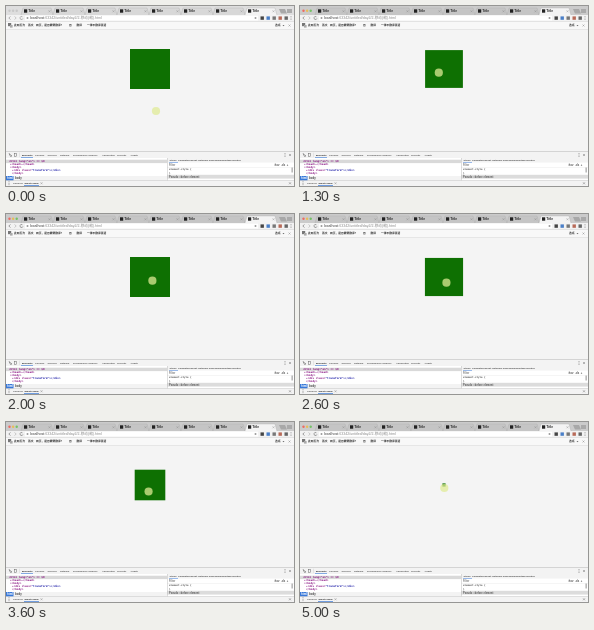
Write an HTML page with a canvas that moves like this. It is 288 by 180 pixels and loops after 6.6 s.

```html
<!DOCTYPE html>
<html lang="en">
<head>
<meta charset="utf-8">
<title>Hover scale demo</title>
<style>
html, body { margin: 0; width: 100%; height: 100%; overflow: hidden; background: #f4f4f4; }
canvas { display: block; width: 288px; height: 180px; }
</style>
</head>
<body>
<canvas id="stage"></canvas>
<script>
const W = 288, H = 180, LOOP = 6600, STEP = 100, SHRINK = 600, MIN_SCALE = 0.08;
const SANS = '"Liberation Sans", "Noto Sans CJK SC", "Noto Sans CJK", sans-serif';
const MONO = '"DejaVu Sans Mono", monospace';
const canvas = document.getElementById('stage');
const ctx = canvas.getContext('2d');
const dpr = window.devicePixelRatio || 1;
canvas.width = W * dpr;
canvas.height = H * dpr;
ctx.scale(dpr, dpr);

// Pointer moves: start, end, from, to
const moves = [
  [150, 700, [150, 105], [137, 66.7]],
  [1230, 1480, [137, 66.7], [146.4, 66.7]],
  [2550, 2980, [146.4, 66.7], [147.3, 120]],
  [3150, 3780, [147.3, 120], [141.4, 57]],
  [4200, 4600, [141.4, 57], [144.3, 66]]
];
// Intervals in which the box is hovered
const hovers = [[1255, 1540], [2560, 2670], [3350, 3520], [4200, LOOP]];

function rect(x, y, w, h, color) {
  ctx.fillStyle = color;
  ctx.fillRect(x, y, w, h);
}

function dot(x, y, r, color) {
  ctx.fillStyle = color;
  ctx.beginPath();
  ctx.arc(x, y, r, 0, Math.PI * 2);
  ctx.fill();
}

function path(points) {
  ctx.beginPath();
  points.forEach(([x, y], i) => i ? ctx.lineTo(x, y) : ctx.moveTo(x, y));
}

function line(points, color, width = 0.6) {
  path(points);
  ctx.strokeStyle = color;
  ctx.lineWidth = width;
  ctx.stroke();
}

function shape(points, color) {
  path(points);
  ctx.fillStyle = color;
  ctx.fill();
}

function text(str, x, y, color, size, font = SANS, weight = 'bold') {
  ctx.fillStyle = color;
  ctx.font = `${weight} ${size}px ${font}`;
  ctx.textBaseline = 'middle';
  ctx.fillText(str, x, y);
  return x + ctx.measureText(str).width;
}

function cross(x, y, color) {
  line([[x - 1, y - 1], [x + 1, y + 1]], color, 0.4);
  line([[x + 1, y - 1], [x - 1, y + 1]], color, 0.4);
}

function menuDots(x, y, color) {
  for (let i = -1; i <= 1; i++) dot(x, y + i * 1.5, 0.45, color);
}

function bezier(a, b, s) {
  return 3 * a * s * (1 - s) ** 2 + 3 * b * s * s * (1 - s) + s ** 3;
}

// CSS "ease"
function ease(t) {
  if (t <= 0) return 0;
  if (t >= 1) return 1;
  let lo = 0, hi = 1;
  for (let i = 0; i < 24; i++) {
    const mid = (lo + hi) / 2;
    if (bezier(0.25, 0.25, mid) < t) lo = mid; else hi = mid;
  }
  return bezier(0.1, 1, lo);
}

function boxScale(t) {
  const hover = hovers.filter(h => t >= h[0]).pop();
  if (!hover) return 1;
  const [enter, leave] = hover;
  let p = ease((Math.min(t, leave) - enter) / SHRINK);
  if (t > leave) p *= 1 - ease((t - leave) / (SHRINK * p));
  return 1 - (1 - MIN_SCALE) * p;
}

function pointer(t) {
  const move = moves.filter(m => t >= m[0]).pop();
  if (!move) return moves[0][2];
  const [start, end, from, to] = move;
  const k = Math.min(1, (t - start) / (end - start));
  const s = k * k * (3 - 2 * k);
  return from.map((v, i) => v + (to[i] - v) * s);
}

function drawTabs(active) {
  rect(0, 0, W, 9, active ? '#cbcbcb' : '#dedede');
  const lights = active ? ['#ee6a62', '#e8bd58', '#74c266'] : ['#c8c8c8', '#c8c8c8', '#c8c8c8'];
  lights.forEach((c, i) => dot(3.5 + i * 3.6, 4.8, 1.2, c));
  for (let i = 0; i < 8; i++) {
    const x = 15 + i * 32;
    const edge = [[x, 9], [x + 2, 2], [x + 30, 2], [x + 32, 9]];
    shape(edge, i === 7 ? '#f3f3f3' : active ? '#c5c5c5' : '#d8d8d8');
    line(edge, '#adadad', 0.4);
    rect(x + 3, 3.3, 3.2, 3.4, '#222');
    text('Title', x + 7.3, 5.2, '#222', 3.3);
    cross(x + 28.5, 5.3, '#888');
  }
  shape([[273, 3], [279, 3], [281, 7.5], [275, 7.5]], '#a8a8a8');
  rect(281, 3, 5, 4, '#aaa');
}

function drawToolbar(active) {
  rect(0, 9, W, 6.5, '#f2f2f2');
  const ink = active ? '#666' : '#888';
  line([[4.5, 10.5], [2.8, 12], [4.5, 13.5]], ink);
  line([[8.5, 10.5], [10.2, 12], [8.5, 13.5]], '#aaa');
  ctx.strokeStyle = ink;
  ctx.beginPath();
  ctx.arc(15.5, 12, 1.5, 0.3, 5.4);
  ctx.stroke();
  rect(19, 9.7, 233, 4.8, '#fff');
  dot(21.5, 12, 1, '#999');
  const x = text('localhost', 24, 12, '#333', 3.6, SANS, 'normal');
  text(':63342/untitled/day2/2-移动(缩).html', x, 12, '#888', 3.6, SANS, 'normal');
  dot(249.5, 12, 1, '#999');
  ['#444', '#4a7fc8', '#777', '#b86a58', '#666'].forEach((c, i) =>
    rect(254.5 + i * 6, 10.4, 3.4, 3.4, c));
  menuDots(285, 12, '#666');
  rect(0, 15.3, W, 0.5, '#c7c7c7');
}

function drawTranslateBar() {
  rect(0, 15.8, W, 8, '#f8f8f8');
  rect(2, 17, 3.2, 3.2, '#777');
  rect(4, 19, 2.6, 2.6, '#aaa');
  [['此网页为', 8], ['英文', 22], ['网页，是否需要翻译？', 30], ['否', 63],
   ['翻译', 70.5], ['一律不翻译英语', 81], ['选项', 269]].forEach(([s, x]) =>
    text(s, x, 19.5, '#333', 2.75));
  shape([[276.5, 19], [278.5, 19], [277.5, 20.2]], '#666');
  cross(283.5, 19.5, '#777');
  rect(0, 23.5, W, 0.5, '#d4d4d4');
}

function drawElements() {
  const tag = '#881280';
  const code = (s, x, y, color = tag) => text(s, x, y, color, 2.7, MONO);
  rect(0, 152, 161, 18, '#fff');
  rect(0, 153.7, 161, 3.4, '#d9d9d9');
  code('<html lang="en"> == $0', 3, 155.4);
  code('▸<head>…</head>', 4, 158.4);
  code('▾<body>', 4, 161.4);
  const x = code('▸<div class=', 6, 164.4);
  code('"transform"></div>', x, 164.4, '#1a1aa6');
  code('</body>', 6, 167.4);
  rect(0, 170, 161, 4.5, '#f3f3f3');
  rect(0, 170, 7.5, 4.5, '#3879d9');
  text('html', 1, 172.3, '#fff', 2.8);
  text('body', 9, 172.3, '#444', 2.8);
}

function drawStyles() {
  rect(161, 152, 127, 22.5, '#fff');
  rect(161, 152, 127, 4.6, '#f3f3f3');
  [['Styles', 163.5], ['Computed', 172], ['Event Listeners', 184.5],
   ['DOM Breakpoints', 203], ['Properties', 223]].forEach(([s, x]) =>
    text(s, x, 154.2, '#444', 2.4));
  rect(163, 156.1, 9, 0.5, '#3879d9');
  text('Filter', 163, 159.2, '#777', 2.6);
  text(':hov  .cls  +', 268, 159.2, '#555', 2.6);
  rect(161, 161.3, 127, 0.3, '#ddd');
  text('element.style {', 163, 163.6, '#555', 2.5, MONO);
  text('}', 163, 167, '#555', 2.5, MONO);
  rect(161, 168.8, 127, 3.8, '#dcdcdc');
  text('Pseudo ::before element', 163, 170.8, '#555', 2.6);
  rect(285.5, 161.5, 1.3, 5, '#aaa');
  rect(161, 152, 0.5, 22.5, '#bdbdbd');
}

function drawDevtools() {
  rect(0, 145.5, W, 34.5, '#f3f3f3');
  rect(0, 145.5, W, 0.5, '#b5b5b5');
  line([[3, 147.5], [6, 150], [4.5, 150.5], [3, 147.5]], '#555', 0.5);
  ctx.strokeStyle = '#666';
  ctx.strokeRect(8.5, 147.3, 2, 3.3);
  rect(13, 146.7, 0.4, 4.4, '#ccc');
  [['Elements', 16], ['Console', 29], ['Sources', 41.5], ['Network', 54],
   ['Performance', 67], ['Memory', 82.5], ['Application', 96],
   ['Security', 111], ['Audits', 124.5]].forEach(([s, x], i) =>
    text(s, x, 148.9, i ? '#555' : '#222', 2.4));
  rect(15, 151.3, 12, 0.6, '#3879d9');
  menuDots(279, 149, '#555');
  cross(284, 149, '#555');
  rect(0, 152, W, 0.4, '#ccc');
  drawElements();
  drawStyles();
  rect(0, 174.4, W, 0.5, '#c4c4c4');
  menuDots(3, 177.3, '#555');
  text('Console', 7, 177.2, '#555', 2.5);
  text("What's New", 18.5, 177.2, '#222', 2.5);
  cross(35.5, 177.3, '#777');
  rect(18, 179.3, 15, 0.7, '#3879d9');
  cross(284, 177.3, '#555');
}

function draw(t) {
  const active = t >= 1000;
  rect(0, 0, W, H, '#f4f4f4');
  drawTabs(active);
  drawToolbar(active);
  drawTranslateBar();
  drawDevtools();
  const size = 40 * boxScale(t);
  rect(144 - size / 2, 63 - size / 2, size, size, '#0e7002');
  const [x, y] = pointer(t);
  dot(x, y, 4.1, 'rgba(224, 235, 150, 0.74)');
}

const begin = performance.now();
function tick() {
  const t = (performance.now() - begin) % LOOP;
  draw(Math.floor(t / STEP) * STEP);
  requestAnimationFrame(tick);
}
tick();
</script>
</body>
</html>
```
